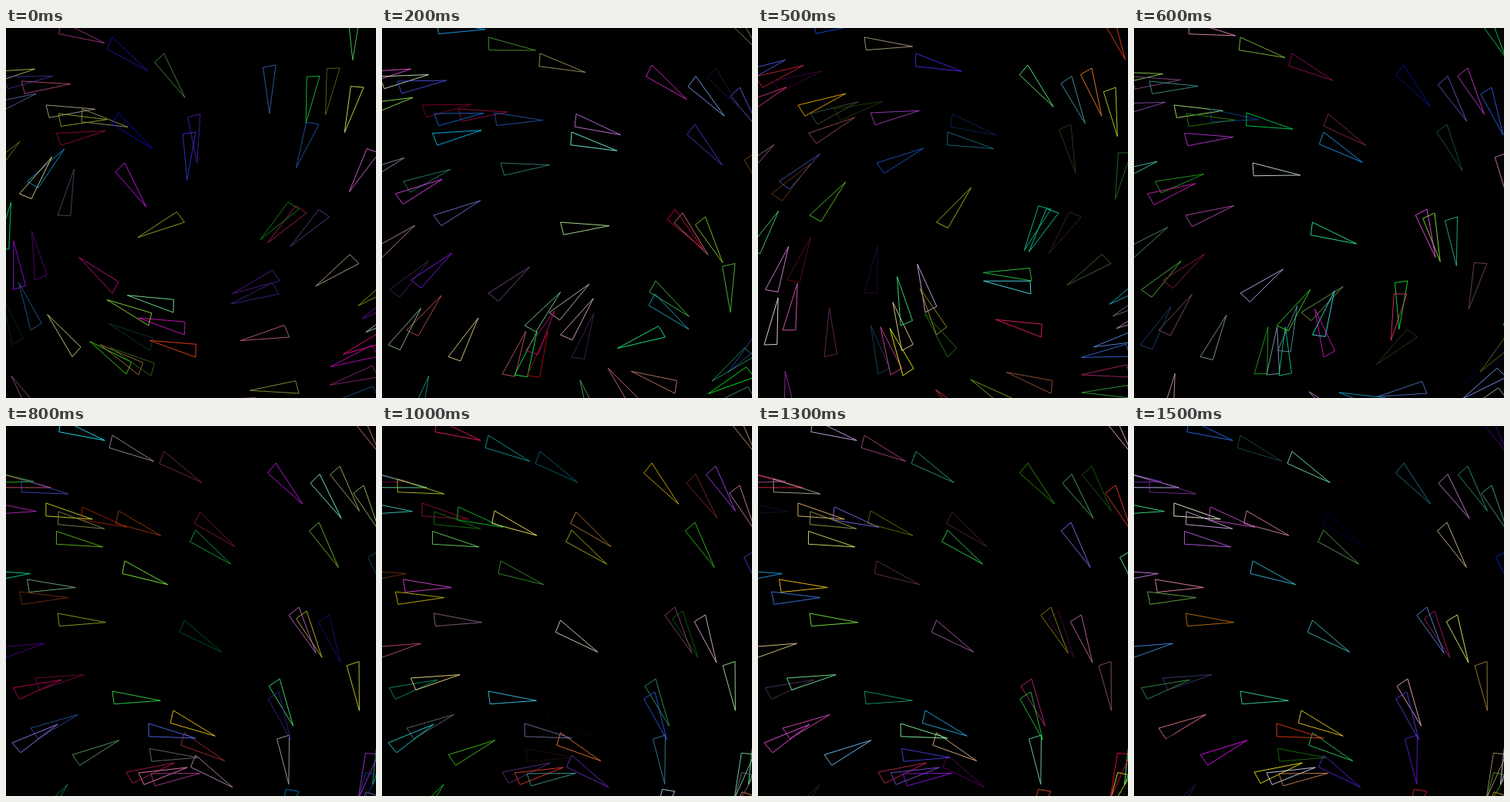
Recreate the animation shown at these times as an HTML page with a canvas. Size 480 by 480 pixels, loop 1600 ms.

```html
<!DOCTYPE html>
<html lang="en">
<head>
<meta charset="utf-8">
<title>Pointing triangles</title>
<style>
  html, body { margin: 0; width: 100%; height: 100%; overflow: hidden; background: #000; }
  canvas { display: block; }
</style>
</head>
<body>
<canvas id="stage" width="480" height="480"></canvas>
<script>
const ctx = document.getElementById('stage').getContext('2d');
const STEP = 100, STEPS = 16;

// Triangles sit on the corners and segment midpoints of these trails.
const trails = [
  [[71, -9], [205, 33]],
  [[-26, 57], [20, 69]],
  [[52, 100], [146, 110]],
  [[-23, 98], [154, 175], [350, 48], [464, 77]],
  [[246, 135], [217, 369], [246, 427]],
  [[390, 240], [526, 371], [514, 332], [483, 480], [483, 426]],
  [[484, 162], [355, 328], [380, 474], [270, 519]],
  [[460, -21], [406, 125], [354, 345]],
  [[68, 111], [-13, 287], [32, 392]],
  [[-32, 187], [67, 243], [8, 411]],
  [[34, 509], [138, 344]],
  [[156, 449], [188, 451], [185, 386]]
];

// Pointer stops; it moves straight between them and rests at the last.
const stops = [
  { step: 0, at: [143, 207] },
  { step: 2, at: [353, 392] },
  { step: 5, at: [301, 252] },
  { step: 7, at: [252, 514] }
];

const mix = (a, b, t) => a.map((v, i) => v + (b[i] - v) * t);

const pivots = trails.flatMap(trail => trail.flatMap((point, i) =>
  i ? [mix(trail[i - 1], point, 0.5), point] : [point]));

function pointerAt(step) {
  const next = stops.findIndex(stop => stop.step > step);
  if (next < 0) return stops[stops.length - 1].at;
  const a = stops[next - 1], b = stops[next];
  return mix(a.at, b.at, (step - a.step) / (b.step - a.step));
}

function seededRandom(seed) {
  return () => {
    seed = (seed + 0x6D2B79F5) | 0;
    let n = Math.imul(seed ^ (seed >>> 15), seed | 1);
    n ^= n + Math.imul(n ^ (n >>> 7), n | 61);
    return ((n ^ (n >>> 14)) >>> 0) / 4294967296;
  };
}

function drawTriangle(x, y, angle, color) {
  ctx.save();
  ctx.translate(x, y);
  ctx.rotate(angle);
  ctx.beginPath();
  ctx.moveTo(0, 0);
  ctx.lineTo(15, 7.5);
  ctx.lineTo(45, -45);
  ctx.closePath();
  ctx.strokeStyle = color;
  ctx.stroke();
  ctx.restore();
}

function draw(step) {
  const random = seededRandom(step * 7919 + 17);
  const channel = () => Math.floor(random() * 256);
  const [px, py] = pointerAt(step);
  ctx.fillStyle = '#000';
  ctx.fillRect(0, 0, 480, 480);
  ctx.lineWidth = 0.8;
  ctx.lineJoin = 'round';
  for (const [x, y] of pivots) {
    const color = `rgb(${channel()}, ${channel()}, ${channel()})`;
    drawTriangle(x, y, Math.atan2(py - y, px - x), color);
  }
}

const start = performance.now();
function tick() {
  draw(Math.floor((performance.now() - start) / STEP) % STEPS);
  requestAnimationFrame(tick);
}
tick();
</script>
</body>
</html>
```
